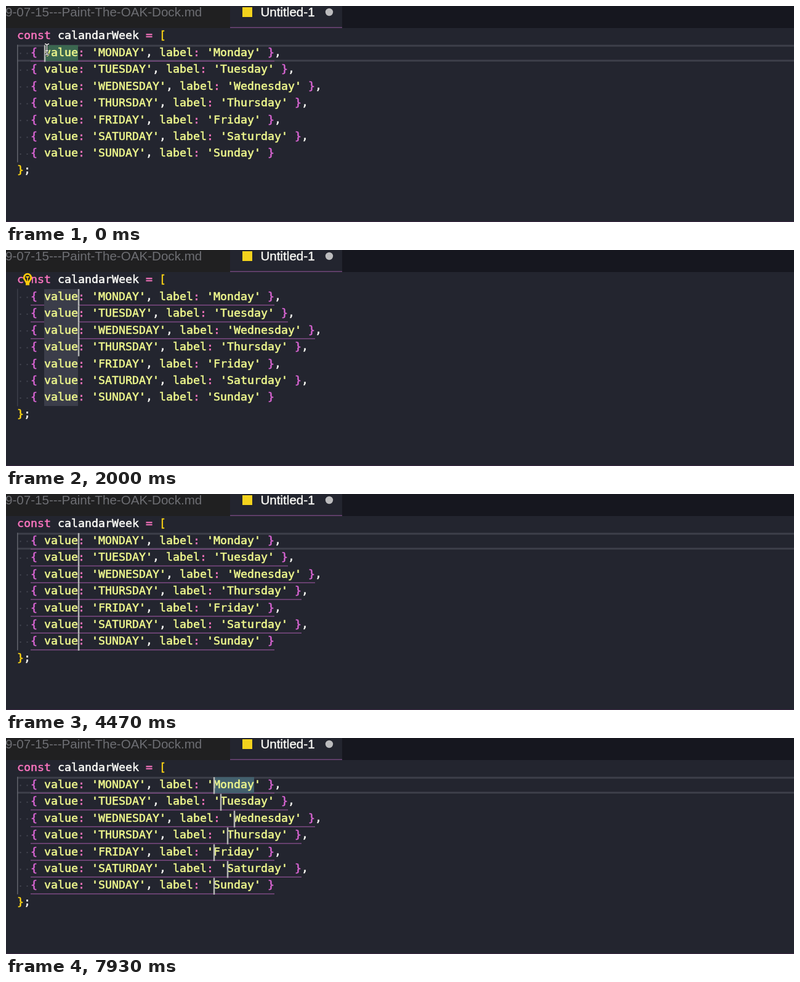
Animation, 1280 px wide and 353 px high, one loop 8000 ms. Source, as an HTML page with a canvas:

```html
<!DOCTYPE html>
<html lang="en">
<head>
<meta charset="utf-8">
<title>Editor with several cursors</title>
<style>
html, body { margin: 0; width: 100%; height: 100%; overflow: hidden; background: #23252f; }
canvas { display: block; width: 1280px; height: 353px; }
</style>
</head>
<body>
<canvas id="stage"></canvas>
<script>
const W = 1280, H = 353, LOOP = 8000;
const LEFT = 18, CHAR = 11, TOP = 36, ROW = 27.43, BASE = 54.45, PX = 1.52;
const CODE = '18.27px "DejaVu Sans Mono", monospace';
const TAB = '20.6px "Liberation Sans", Arial, sans-serif';
const DAYS = ['Monday', 'Tuesday', 'Wednesday', 'Thursday', 'Friday', 'Saturday', 'Sunday'];
const C = {
  bg: '#23252f', bar: '#16171f', idle: '#202021', idleText: '#6d6e73',
  white: '#f8f8f4', pink: '#f673bd', gold: '#ffd614', orchid: '#d965d3',
  text: '#eef78d', select: '#3b3d4a', line: '#3d3f4a', rule: '#7d4a84',
  green: '#3b6650', blue: '#43606d', caret: '#b4b5b4', icon: '#f3d21d'
};

// Keyboard events, in ms
const SELECT = 530, BULB = 800, ADD = 1530, ADD_GAP = 200, RULE_LAG = 150, RELEASE = 4300;
const LAST_ADD = ADD + 5 * ADD_GAP;

// Caret moves: start time and column for a day name of length n
const MOVES = [
  [RELEASE, n => 9],
  [5330, n => 12 + n],
  [5570, n => 14 + n],
  [7090, n => 20 + n],
  [7330, n => 23 + 2 * n],
  [7550, n => 23 + n]
];

const canvas = document.getElementById('stage');
const ctx = canvas.getContext('2d');
const dpr = window.devicePixelRatio || 1;
canvas.width = W * dpr;
canvas.height = H * dpr;

const colX = col => LEFT + col * CHAR;
const rowTop = row => TOP + row * ROW;
const between = (t, a, b) => t >= a && t < b;

function box(x, y, w, h, color) {
  ctx.fillStyle = color;
  ctx.fillRect(x, y, w, h);
}

function write(str, x, y, color, weight) {
  ctx.fillStyle = ctx.strokeStyle = color;
  ctx.fillText(str, x, y);
  if (weight) {
    ctx.lineWidth = weight;
    ctx.strokeText(str, x, y);
  }
}

// Parts alternate between text and colour
function codeLine(row, col, ...parts) {
  const y = Math.round(BASE + row * ROW);
  for (let i = 0; i < parts.length; i += 2) {
    write(parts[i], colX(col), y, parts[i + 1], 0.55);
    col += parts[i].length;
  }
}

function drawTabs() {
  box(0, 0, W, TOP, C.bar);
  box(0, 0, 364, TOP, C.idle);
  box(364, 0, 182, TOP, C.bg);
  box(364, TOP - PX, 182, PX, '#70467a');
  ctx.font = TAB;
  write('9-07-15---Paint-The-OAK-Dock.md', -1, 17, C.idleText);
  write('Untitled-1', 413.5, 17, C.white, 0.4);
  box(384, 2, 16, 16, C.icon);
  ctx.fillStyle = '#bcbcbe';
  ctx.beginPath();
  ctx.arc(525, 10, 6.2, 0, 7);
  ctx.fill();
}

function drawCode() {
  ctx.font = CODE;
  codeLine(0, 0, 'const', C.pink, ' calandarWeek', C.white, ' =', C.pink, ' [', C.gold);
  DAYS.forEach((day, i) => {
    const row = i + 1;
    const y = rowTop(row) + 13;
    box(colX(0.5) - 1, y, 2, 2, '#454752');
    box(colX(1.5) - 1, y, 2, 2, '#454752');
    codeLine(row, 2,
      '{', C.orchid, ' value', C.text, ':', C.pink, ` '${day.toUpperCase()}'`, C.text,
      ',', C.white, ' label', C.text, ':', C.pink, ` '${day}'`, C.text,
      ' }', C.orchid, i < 6 ? ',' : '', C.white);
  });
  codeLine(8, 0, '}', C.gold, ';', C.white);
}

function drawCurrentLine(t) {
  const selected = between(t, SELECT, RELEASE);
  if (!selected) {
    box(LEFT, rowTop(1), W, 2 * PX, C.line);
    box(LEFT, rowTop(2) - 2 * PX, W, 2 * PX, C.line);
  }
  box(LEFT, rowTop(1), PX, 7 * ROW, selected ? '#3c3e49' : '#62646d');
}

function drawRules(t) {
  DAYS.forEach((day, i) => {
    const start = i ? ADD + (i - 1) * ADD_GAP + RULE_LAG : 0;
    if (t >= start) {
      box(colX(2), rowTop(i + 2) - PX, (24 + 2 * day.length) * CHAR, PX, C.rule);
    }
  });
}

function drawHighlights(t) {
  const mark = (col, chars, rows, color) =>
    box(colX(col), rowTop(1) + 0.5, chars * CHAR, rows * ROW - 1, color);
  if (between(t, SELECT, RELEASE)) mark(4, 5, 7, C.select);
  if (t < SELECT || between(t, RELEASE + 250, 5330)) mark(4, 5, 1, C.green);
  if (t >= 7800) mark(29, 6, 1, C.blue);
}

function drawCarets(t) {
  let since = 0, count = 1, place = () => 4;
  if (t >= SELECT) {
    place = () => 9;
    since = SELECT;
    if (t >= ADD) {
      const added = Math.min(6, 1 + Math.floor((t - ADD) / ADD_GAP));
      count = 1 + added;
      since = Math.min(LAST_ADD, ADD + (added - 1) * ADD_GAP);
    }
  }
  for (const [start, col] of MOVES) {
    if (t >= start) {
      since = start;
      place = col;
    }
  }
  if ((t - since) % 1000 >= 500) return;
  for (let i = 0; i < count; i++) {
    box(colX(place(DAYS[i].length)) - 0.2, rowTop(i + 1) + 0.5, 2.5, ROW, C.caret);
  }
}

function drawBulb() {
  box(28, 38, 14, 20, C.bg);
  ctx.fillStyle = '#24231f';
  ctx.strokeStyle = '#ffcb0c';
  ctx.lineWidth = 2.8;
  ctx.beginPath();
  ctx.arc(35, 45, 5.8, 0.75 * Math.PI, 0.25 * Math.PI);
  ctx.lineTo(37.6, 52);
  ctx.lineTo(32.4, 52);
  ctx.closePath();
  ctx.fill();
  ctx.stroke();
  box(32, 53, 6, 4.5, '#ffcb0c');
  box(32.4, 43, 5.2, 2, '#ffcb0c');
  box(34.2, 43, 1.6, 9, '#ffcb0c');
}

function drawPointer() {
  const path = new Path2D('M63 62 Q66.5 62 66.5 65 Q66.5 62 70 62 M66.5 65 V77 M63 80 Q66.5 80 66.5 77 Q66.5 80 70 80 M64.5 73 H68.5');
  ctx.strokeStyle = '#15161c';
  ctx.lineWidth = 3.2;
  ctx.stroke(path);
  ctx.strokeStyle = '#f2f2f2';
  ctx.lineWidth = 1.4;
  ctx.stroke(path);
}

function draw(t) {
  ctx.setTransform(dpr, 0, 0, dpr, 0, 0);
  box(0, 0, W, H, C.bg);
  drawTabs();
  drawCurrentLine(t);
  drawRules(t);
  drawHighlights(t);
  drawCode();
  drawCarets(t);
  if (between(t, BULB, RELEASE)) drawBulb();
  if (t < SELECT) drawPointer();
  box(0, 352, W, 1, '#3b2541');
}

const begin = performance.now();
function tick() {
  draw((performance.now() - begin) % LOOP);
  requestAnimationFrame(tick);
}
tick();
</script>
</body>
</html>
```
